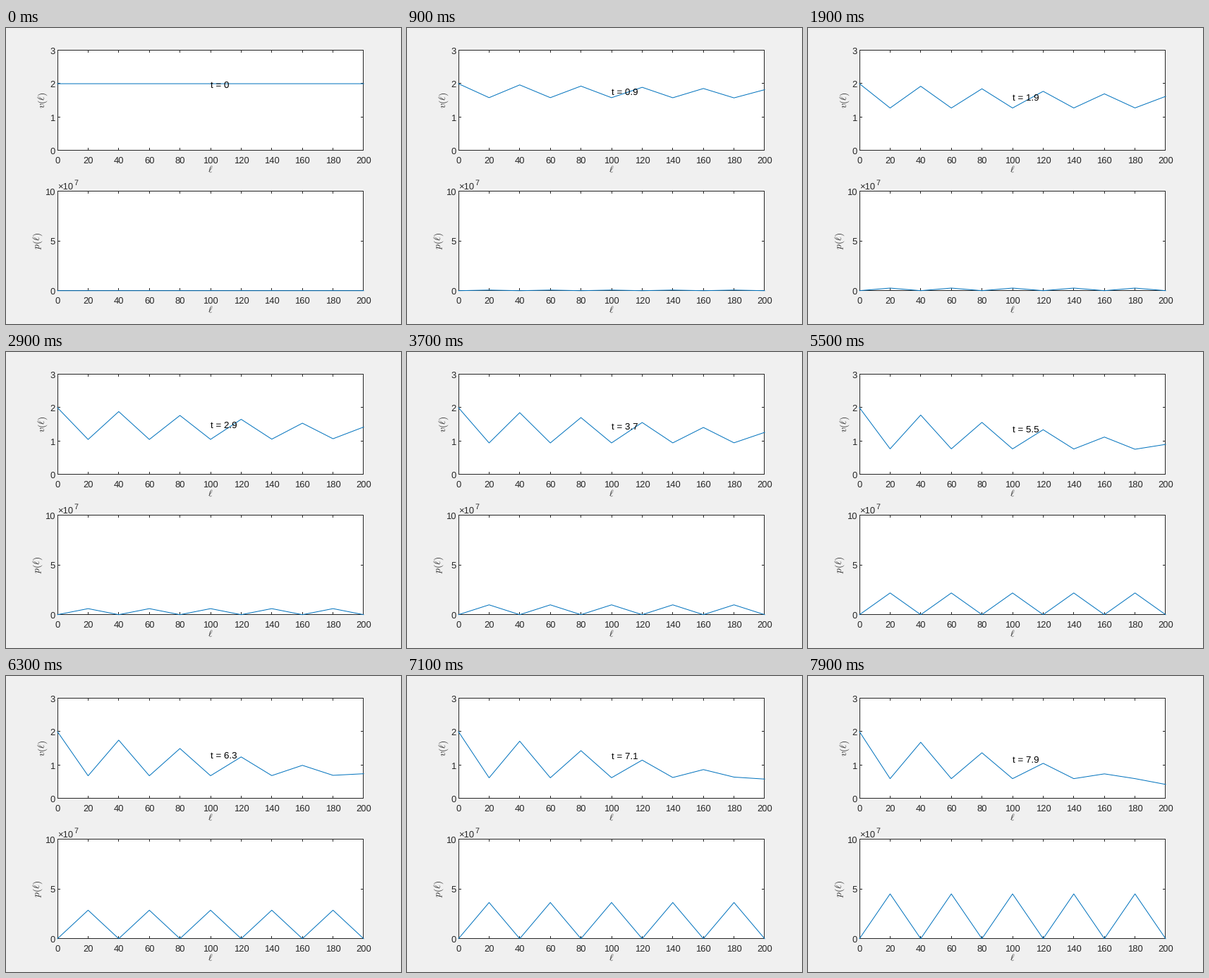
Write a matplotlib script that moves like this. It is 560x420 px and loops after 8 s.

```python
import numpy as np
import matplotlib.pyplot as plt
from matplotlib.animation import FuncAnimation

W, H, DPI = 560, 420, 100
PT = 72 / DPI                      # points per pixel
FRAMES, STEP = 80, 100
LEFT, RIGHT = 73.5, 506.5          # frame lines
X0, SPAN = 73, 434                 # data range on screen
V_BOX, P_BOX = (31.5, 173.5), (231.5, 372.5)
BLUE, INK = (0, 114 / 255, 189 / 255), (0.15,) * 3

plt.rcParams["font.family"] = "Liberation Sans"
plt.rcParams["mathtext.fontset"] = "cm"
plt.rcParams["text.hinting"] = "none"

fig = plt.figure(figsize=(W / DPI, H / DPI), dpi=DPI, facecolor="#f0f0f0")
ax = fig.add_axes([0, 0, 1, 1])
ax.set(xlim=(0, W), ylim=(H, 0))
ax.axis("off")


def stroke(xs, ys, color=INK, z=2):
    return ax.plot(xs, ys, color=color, lw=PT, snap=False, zorder=z,
                   solid_capstyle="projecting", solid_joinstyle="round")[0]


def label(x, y, s, size=13, ha="center", va="baseline", color=INK, **kw):
    return ax.text(x, y, s, fontsize=size * PT, ha=ha, va=va, color=color,
                   zorder=5, **kw)


def panel(box, yticks, name, name_x):
    """Boxed axes with inward ticks on all four sides."""
    top, bottom = box
    tick = 3
    ax.fill([LEFT, RIGHT, RIGHT, LEFT], [top, top, bottom, bottom],
            color="white", lw=0, zorder=1)
    stroke([LEFT, RIGHT, RIGHT, LEFT, LEFT], [top, top, bottom, bottom, top])
    for k in range(11):
        x = X0 + SPAN * k / 10
        label(x, bottom + 18.5, str(20 * k))
        if 0 < k < 10:
            x = np.floor(x) + 0.5
            stroke([x, x], [bottom, bottom - tick])
            stroke([x, x], [top, top + tick])
    for value in yticks:
        y = np.floor(bottom - (bottom - top) * value / yticks[-1]) + 0.5
        stroke([LEFT, LEFT + tick], [y, y])
        stroke([RIGHT, RIGHT - tick], [y, y])
        label(69.5, y + 5, str(value), ha="right")
    label(290, bottom + 27.8, r"$\ell$", 13.5, va="center")
    label(name_x, (top + bottom) / 2, name, 13.5, va="center", rotation=90)


panel(V_BOX, (0, 1, 2, 3), r"$v(\ell)$", 52.5)
panel(P_BOX, (0, 5, 10), r"$p(\ell)$", 45.5)
label(73.5, 229, "×10", ha="left")
label(96.5, 223, "7", 10.67, ha="left")

ell = np.arange(0, 201, 20)
odd = ell % 40 == 20
xs = X0 + ell / 200 * SPAN


def speed(t):
    """Linear loss at even nodes, quadratic friction plus a ripple at odd ones."""
    fade = 1 - ((ell - 20) / 160) ** 3
    ripple = -0.022 * np.cos(2 * np.pi * (t - 2.8) / 4.1) * min(1, t / 2.8)
    return np.where(odd, 1 / (0.5 + 0.15 * t) + ripple * fade,
                    2 - 0.001 * t * ell)


def pressure(t):
    return np.where(odd, 0.0722 * t ** 2, 0)


def row(value, box, limit):
    top, bottom = box
    return bottom + 0.2 - (bottom - top) * value / limit


v_line = stroke(xs, xs, BLUE, 4)
p_line = stroke(xs, xs, BLUE, 4)
clock = label(290, 0, "", 13.33, ha="left", color="black")


def draw(i):
    t = i / 10
    v = speed(t)
    v_line.set_ydata(row(v, V_BOX, 3))
    p_line.set_ydata(row(pressure(t), P_BOX, 10))
    clock.set_text(f"t = {t:g}")
    clock.set_y(round(row((v.min() + v.max()) / 2, V_BOX, 3) + 6.3))
    return v_line, p_line, clock


anim = FuncAnimation(fig, draw, frames=FRAMES, interval=STEP, repeat=True,
                     repeat_delay=0)
plt.show()
```
